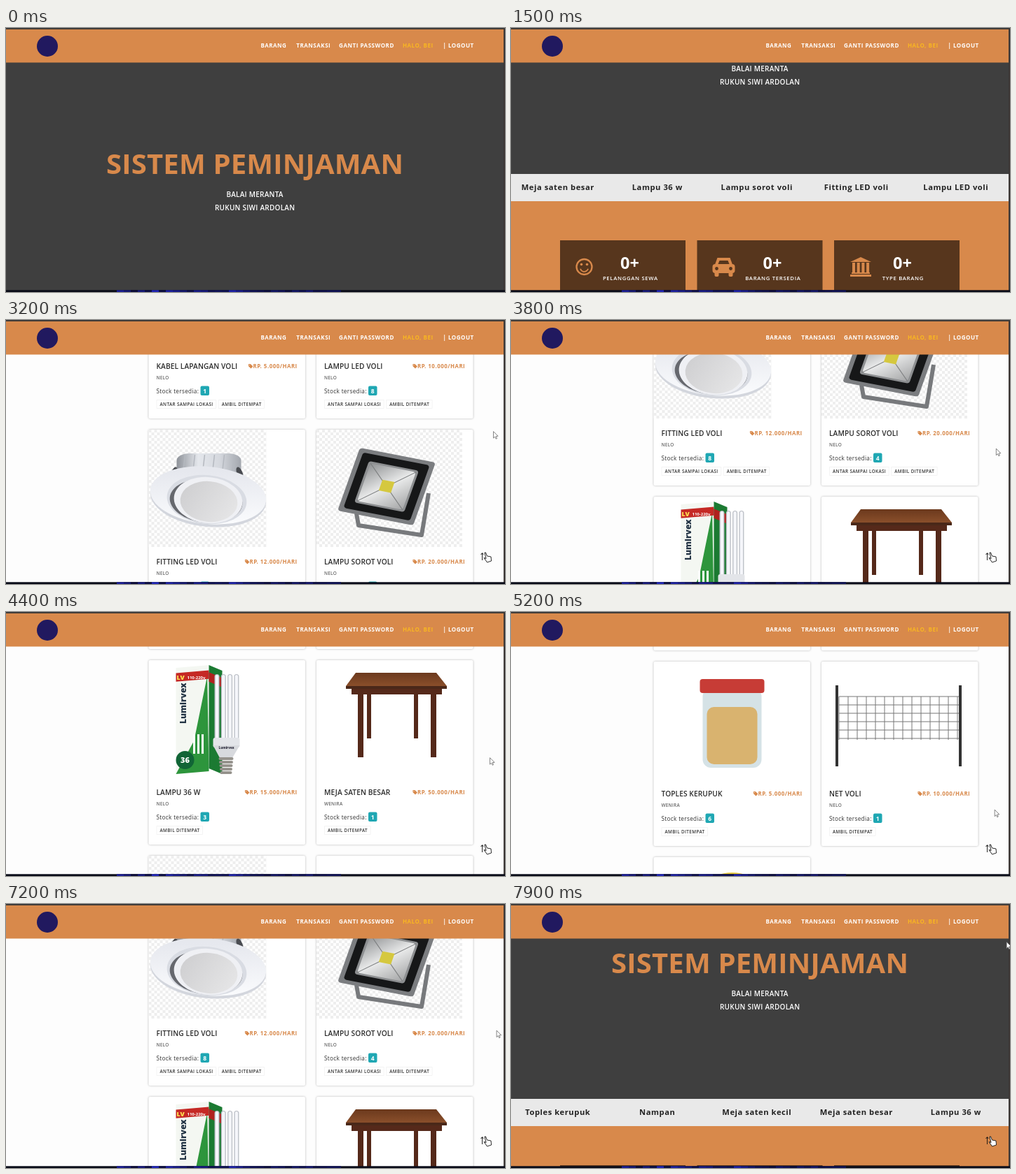
Recreate the animation shown at these times as an HTML page with a canvas. Size 712 by 378 pixels, loop 8000 ms.

```html
<!DOCTYPE html>
<html lang="id">
<head>
<meta charset="utf-8">
<title>Sistem Peminjaman</title>
<style>
html, body { margin: 0; width: 100%; height: 100%; overflow: hidden; background: #3f3f3f; }
canvas { display: block; width: 712px; height: 378px; }
</style>
</head>
<body>
<canvas id="stage" width="712" height="378"></canvas>
<script>
const c = document.getElementById('stage').getContext('2d');
const LOOP = 8000, STEP = 100, END = 2341;
const ORANGE = '#d8894b', DARK = '#3f3f3f', BROWN = '#57361d', YELLOW = '#ffd60a';

// the scrollbar is dragged: time and pointer height
const drag = [[1200, 38], [1500, 62], [2400, 111.9], [3200, 158.1], [4400, 207.2],
  [6150, 370], [7900, 52.7], [8000, 46]];
function dragY(t) {
  const i = drag.findIndex(k => k[0] >= t);
  if (i < 1) return drag[0][1];
  const [t0, y0] = drag[i - 1], [t1, y1] = drag[i];
  return y0 + (y1 - y0) * (t - t0) / (t1 - t0);
}
const scrollAt = t => Math.min(END, Math.round((dragY(t) - 38) * 7.5));

function text(s, x, y, size, weight, color, gap = 0, align = 'left') {
  c.font = `${weight} ${size}px "Open Sans", sans-serif`;
  c.letterSpacing = gap + 'px';
  c.textAlign = align;
  c.fillStyle = color;
  c.fillText(s, x + (align === 'center' ? gap / 2 : 0), y);
  return c.measureText(s).width;
}
function rect(color, x, y, w, h) {
  c.fillStyle = color;
  c.fillRect(x, y, w, h);
}
function round(color, x, y, w, h, r) {
  c.beginPath();
  c.roundRect(x, y, w, h, r);
  c.fillStyle = color;
  c.fill();
}
function path(pts, closed) {
  c.beginPath();
  for (let i = 0; i < pts.length; i += 2) c.lineTo(pts[i], pts[i + 1]);
  if (closed) c.closePath();
}
function poly(color, ...pts) {
  path(pts, true);
  c.fillStyle = color;
  c.fill();
}
function line(color, width, ...pts) {
  path(pts);
  c.strokeStyle = color;
  c.lineWidth = width;
  c.stroke();
}
function oval(color, x, y, rx, ry = rx, tilt = 0, width = 0) {
  c.beginPath();
  c.ellipse(x, y, rx, ry, tilt, 0, 7);
  c.fillStyle = c.strokeStyle = color;
  c.lineWidth = width;
  width ? c.stroke() : c.fill();
}
function at(x, y, draw, scale = 1) {
  c.save();
  c.translate(x, y);
  c.scale(scale, scale);
  draw();
  c.restore();
}
// draws in a unit square spanned by the edges u and v
function plane(x, y, ux, uy, vx, vy, draw) {
  c.save();
  c.transform(ux, uy, vx, vy, x, y);
  draw();
  c.restore();
}
const inset = (color, d, r = .04) => round(color, d, d, 1 - 2 * d, 1 - 2 * d, r);
function fade(x0, y0, x1, y1, ...colors) {
  const g = c.createLinearGradient(x0, y0, x1, y1);
  colors.forEach((s, i) => g.addColorStop(i / (colors.length - 1), s));
  return g;
}

const tile = document.createElement('canvas');
tile.width = tile.height = 8;
const tc = tile.getContext('2d');
tc.fillStyle = '#fff';
tc.fillRect(0, 0, 8, 8);
tc.fillStyle = '#eeeeee';
tc.fillRect(0, 0, 4, 4);
tc.fillRect(4, 4, 4, 4);
const checks = c.createPattern(tile, 'repeat');

// icons
function car(color, hole) {
  poly(color, -13, -2, -9, -13, 9, -13, 13, -2);
  round(color, -16, -4, 32, 13, 4);
  poly(hole, -8, -4, -6, -9, 6, -9, 8, -4);
  for (const x of [-10, 10]) {
    round(color, x - 3, 6, 6, 8, 2);
    oval(hole, x, 2.5, 2.4);
  }
}
function bank() {
  poly(ORANGE, -15, -7, 0, -14, 15, -7);
  for (let i = 0; i < 4; i++) rect(ORANGE, -12 + i * 6.7, -6, 4, 14);
  rect(ORANGE, -13, 8, 26, 2);
  rect(ORANGE, -15, 11, 30, 3);
}
function smile() {
  oval(ORANGE, 0, 0, 11, 11, 0, 2.3);
  for (const x of [-4, 4]) oval(ORANGE, x, -3.5, 1.8);
  c.beginPath();
  c.arc(0, 1, 5.8, .3, 2.84);
  c.lineWidth = 1.8;
  c.stroke();
}
const badge = (x, y) => oval('#21195f', x, y, 15);

// product pictures, from the card's top left corner
function socketStrip() {
  for (let i = 0; i < 6; i++)
    for (const [color, w] of [['#aaa69d', 5.5], ['#e5e2db', 4]])
      oval(color, 54 + i * 5, 74 - i * 3, 48, 15 + i, -.55, w);
  line('#dedad2', 5, 10, 125, 70, 66, 118, 32);
  line('#34322f', 4, 104, 25, 114, 22);
  for (let d = 13; d >= 0; d--)
    plane(62, 112 + d, 122, -80, 31, 20, () => inset(d ? '#bfb9ae' : '#e9e6df', 0, .12));
  plane(62, 112, 122, -80, 31, 20, () => {
    rect('#5f1116', .06, .12, .16, .76);
    rect('#a5222a', .08, .18, .12, .6);
  });
  for (let i = 0; i < 3; i++) at(117 + i * 32, 92 - i * 21, () => {
    ['#aaa79f', '#f4f2ed', '#c9c5bd'].forEach((s, k) => oval(s, 0, 0, 18 - k * 3, 14.5 - k * 2.7, -.25));
    for (const x of [-5, 5]) oval('#4b4945', x, -x / 4, 1.5);
  });
}
function floodLight() {
  line('#252423', 5, 163, 89, 186, 139, 158, 151);
  plane(62, 30, 112, 4, -17, 112, () => {
    inset('#111', 0);
    inset('#34312f', .02);
    rect('#777772', .12, .15, .68, .44);
    rect('#cfcdc3', .15, .18, .62, .37);
    rect('#e9df91', .43, .27, .28, .27);
    for (let i = 0; i < 16; i++) rect('#f8f3c5', .45 + i % 4 * .065, .29 + (i >> 2) * .06, .04, .04);
  });
  text('lumen', 108, 129, 5, 600, '#67615d');
}
function downLight() {
  rect(checks, 0, 0, 168, 168);
  plane(40, 34, 92, 0, 0, 50, () => inset(fade(0, 0, 1, 0, '#8e9299', '#e4e7ec', '#d5d8de', '#a3a7ae'), 0, .2));
  for (let x = 52; x < 125; x += 14) line('#b4b8bf', 1.5, x, 36, x - 3, 62);
  for (const x of [36, 130]) oval('#4a4c51', x, 62, 4, 9, x < 80 ? .4 : -.4);
  oval('#d3d6dd', 85, 97, 83, 42, .1);
  oval(fade(0, 60, 0, 135, '#e6e8ee', '#fafbfd'), 85, 94, 83, 41, .1);
  oval('#d9dce3', 83, 100, 57, 35, .1);
  oval('#66686e', 82, 102, 52, 31, .1);
  oval('#eff0f4', 85, 101, 49, 33, .1);
  oval(fade(50, 80, 120, 130, '#cfcfd1', '#e6e6e7'), 86, 103, 41, 29, .1);
}
function spotLight() {
  rect(checks, 0, 0, 208, 168);
  line('#77797c', 6, 57, 120, 60, 137, 150, 151, 160, 91);
  plane(62, 26, 108, 21, -32, 90, () => {
    inset('#7b7d80', 0);
    inset('#161718', .06);
    inset('#8d8f91', .17);
    inset(fade(.2, .2, .8, .8, '#8f9193', '#e9eaea', '#a4a5a6'), .2);
    for (const [a, b] of [[.2, .2], [.8, .2], [.8, .8], [.2, .8]]) line('#7d7f80', .01, a, b, .5, .5);
    rect('#d5c83f', .42, .41, .16, .17);
  });
}
function bulbBox() {
  plane(39, 11, 47, -4, 0, 152, () => {
    inset('#f4f7f2', 0, 0);
    poly('#2d953c', .95, .1, 1, 1, 0, 1, .55, .7);
    rect('#c52925', 0, .05, 1, .08);
  });
  plane(86, 7, 19, 8, 0, 148, () => {
    inset('#1b7a32', 0, 0);
    rect('#b0211e', 0, .07, 1, .09);
  });
  text('LV', 40, 28, 9, 800, '#ffe451');
  text('110-220v', 55, 27, 6, 700, '#fff');
  at(53, 91, () => { c.rotate(-Math.PI / 2); text('Lumirvex', 0, 0, 12, 800, '#234'); });
  for (let i = 0; i < 3; i++) line('#fff', 3, 65 + i * 6, 134, 65 + i * 6, 106);
  oval('#116536', 52, 143, 13);
  text('36', 52, 147, 11, 800, '#fff', 0, 'center');
  for (let x = 94; x < 125; x += 9.3) {
    round('#b9bdc4', x, 20, 7, 94, 4);
    round('#f5f6fa', x + 1.3, 21, 4.4, 92, 3);
  }
  round('#e3e5e9', 92, 111, 38, 14, 3);
  poly('#d8dade', 92, 122, 130, 122, 120, 139, 101, 139);
  text('Lumirvex', 111, 127, 4.5, 800, '#334', 0, 'center');
  for (let i = 0; i < 5; i++) round('#96938d', 100 + i / 2, 139 + i * 5, 21 - i, 4, 2);
}
function table(top, leg) {
  for (const x of [72, 139]) rect(leg, x, 42, 6, 70);
  for (const x of [59, 163]) rect(leg, x, 42, 8, 97);
  rect(leg, 50, 38, 129, 11);
  poly(top, 56, 18, 171, 18, 186, 37, 42, 37);
  rect('#4a2819', 42, 37, 144, 4);
}
const bigTable = () => table(fade(0, 18, 0, 37, '#6b391d', '#8a4f2b'), '#55291a');
function smallTable() {
  rect(checks, 0, 0, 168, 168);
  at(0, 26, () => table('#b38a5c', '#76512f'), .76);
}
function tray() {
  ['#a9adb0', '#d9dcde', '#c2c6c9'].forEach((s, i) => oval(s, 112, 86 - i, 83 - i * 8, 42 - i * 6));
}
function jar() {
  round('#d5e2e6', 70, 38, 84, 114, 12);
  round('#d9b36f', 76, 65, 72, 82, 10);
  round('#c73c36', 66, 25, 92, 20, 4);
}
function net() {
  for (let x = 25; x < 200; x += 13) line('#777', 1, x, 50, x, 112);
  for (let y = 50; y < 113; y += 12) line('#777', 1, 25, y, 197, y);
  for (const x of [20, 196]) rect('#333', x, 34, 4, 116);
}
function ball() {
  oval('#e6c940', 112, 84, 62);
  oval('#3b61a4', 112, 84, 62, 24, .6);
}

const BOTH = ['ANTAR SAMPAI LOKASI', 'AMBIL DITEMPAT'], PICKUP = ['AMBIL DITEMPAT'];
const goods = [
  ['KABEL LAPANGAN VOLI', '5.000', 'NELO', '1', BOTH, socketStrip],
  ['LAMPU LED VOLI', '10.000', 'NELO', '8', BOTH, floodLight],
  ['FITTING LED VOLI', '12.000', 'NELO', '8', BOTH, downLight],
  ['LAMPU SOROT VOLI', '20.000', 'NELO', '4', BOTH, spotLight],
  ['LAMPU 36 W', '15.000', 'NELO', '3', PICKUP, bulbBox],
  ['MEJA SATEN BESAR', '50.000', 'WENIRA', '1', PICKUP, bigTable],
  ['MEJA SATEN KECIL', '30.000', 'WENIRA', '2', PICKUP, smallTable],
  ['NAMPAN', '5.000', 'WENIRA', '9', PICKUP, tray],
  ['TOPLES KERUPUK', '5.000', 'WENIRA', '6', PICKUP, jar],
  ['NET VOLI', '10.000', 'NELO', '1', PICKUP, net],
  ['BOLA VOLI', '5.000', 'NELO', '-', [], ball]
];

function product([name, price, owner, stock, tags, picture]) {
  c.save();
  c.shadowColor = 'rgba(0,0,0,.3)';
  c.shadowBlur = 3;
  round('#fff', 0, 0, 223.5, tags.length ? 264 : 251, 2);
  c.restore();
  picture();
  text(name, 11, 192.7, 10.2, 600, '#2c2c2c', .08);
  const w = text(`RP. ${price}/HARI`, 212.2, 192, 7.9, 700, ORANGE, .5, 'right');
  at(212.2 - w - 6.5, 186, () => {
    poly(ORANGE, 0, 0, 3, 0, 6.5, 3.5, 3.5, 6.5, 0, 3);
    oval('#fff', 1.5, 1.5, .6);
  });
  text(owner, 11, 207.6, 6.4, 600, '#666', .25);
  text('Stock tersedia:', 11, 227.6, 8.2, 400, '#333', .33);
  const bw = stock === '-' ? 10.5 : 12.5;
  round('#1fa7b3', 74, 217.5, bw, 13.5, 2);
  text(stock, 74 + bw / 2, 227.6, 8.5, 700, '#fff', 0, 'center');
  let x = 11.5;
  for (const tag of tags) {
    const tw = text(tag, x + 4.5, 246.2, 6.3, 600, '#333', .4);
    c.strokeStyle = '#f3f3f3';
    c.lineWidth = 1;
    c.strokeRect(x, 237.5, tw + 8.5, 12);
    x += tw + 12;
  }
}

const rental = ['Toples kerupuk', 'Nampan', 'Meja saten kecil', 'Meja saten besar',
  'Lampu 36 w', 'Lampu sorot voli', 'Fitting LED voli', 'Lampu LED voli'];

function hero(t) {
  rect(DARK, 0, 0, 712, 389);
  text('SISTEM PEMINJAMAN', 355, 209, 40, 700, ORANGE, .2, 'center');
  text('BALAI MERANTA', 355, 241.5, 10, 600, '#fff', .25, 'center');
  text('RUKUN SIWI ARDOLAN', 355, 260.5, 10, 600, '#fff', .25, 'center');
  rect('#e9e9e9', 0, 389, 712, 39);
  const first = 3 - Math.floor(t / 2000);
  for (let i = 0; i < 5; i++)
    text(rental[first + i], 66.5 + i * 142, 412, 11.2, 700, '#222', .55, 'center');
}

function counters() {
  rect(ORANGE, 0, 428, 712, 190);
  [['PELANGGAN SEWA', 100, smile],
   ['BARANG TERSEDIA', 108, () => car(ORANGE, BROWN)],
   ['TYPE BARANG', 98, bank]].forEach(([label, mid, icon], i) => at(70 + i * 195.5, 484, () => {
    rect(BROWN, 0, 0, 179, 79);
    at(i ? 38 : 34.5, 38, icon);
    text('0+', mid - .5, 40.5, 23.5, 700, '#fff', 0, 'center');
    text(label, mid, 57, 7.7, 600, '#fff', .7, 'center');
  }));
}

function catalog() {
  rect('#fdfdfd', 0, 618, 712, 1870);
  text('PILIH KEBUTUHAN ANDA', 355, 692, 17.7, 700, '#222', .7, 'center');
  for (const x of [316, 365.5]) rect('#333', x, 707, 28.5, 1.2);
  at(355, 708, () => car('#e5d52b', '#fdfdfd'), .35);
  text('Pilih Segala Kebutuhan Anda, dan Segera Koordinasikan dengan Penanggungjawab Barang',
    355, 730, 8.6, 300, '#444', .35, 'center');
  rect('#e8e8e8', 43, 778.5, 145, 1);
  ['ALL', 'PERALATAN OLAHRAGA', 'PERALATAN SINOMAN', 'PERALATAN NON SEWA'].forEach((s, i) => {
    const y = 779 + i * 26.4;
    rect(i ? '#dcdcdc' : '#786ccf', 43, y + 3, 2, 20);
    rect('#e8e8e8', 43, y + 26, 145, 1);
    text(s, 57, y + 16, 7.8, 600, i ? '#222' : '#786ccf', .58);
  });
  goods.forEach((g, i) => at(i % 2 ? 443 : 203.5, 778 + (i >> 1) * 280, () => product(g)));
}

function footer() {
  rect(ORANGE, 0, 144, 712, 202);
  text('TENTANG KAMI', 43, 190, 12, 600, '#fff', .8);
  badge(59, 225);
  text('Lumampahing Karsa Siwi Rahayuning Budi', 43, 262, 7.5, 500, '#fff', .3);
  text('HUBUNGI KAMI', 363, 190, 12, 600, '#fff', .8);
  text('Balai Meranta Rukun Siwi Ardolan', 363.5, 220, 7.5, 500, '#fff', .45);
  oval(YELLOW, 366, 244, 2.7);
  poly(YELLOW, 363.5, 245, 368.5, 245, 366, 250);
  oval(ORANGE, 366, 244, 1);
  text('Bentaru, Sukamiring, Lodaran, Wetan Sarwi, JTU', 374, 249, 8.4, 600, YELLOW, .3);
  round(YELLOW, 363.5, 264, 8.5, 6.5, 1);
  line(ORANGE, .8, 363.5, 265.5, 367.8, 268, 372, 265.5);
  text('ardolan52@surat.test', 375, 270, 8.6, 600, YELLOW, .3);
  rect('#f7d80d', 363.5, 289, 95.5, 23);
  text('SHOW LOCATION', 411, 303.2, 7.2, 600, '#222', .6, 'center');
  rect('#000', 0, 345.5, 712, 32);
  text('Copyright © Balai Meranta Rukun-Siwi Ardolan', 355, 362.5, 8.2, 400, '#fff', .45, 'center');
}

function navbar() {
  rect(ORANGE, 0, 0, 712, 49.5);
  badge(59, 26);
  [['BARANG', 363.4], ['TRANSAKSI', 414.3], ['GANTI PASSWORD', 475.1],
   ['HALO, BEI', 565.9, '#f8b622'], ['| LOGOUT', 623.4]].forEach(([s, x, color]) =>
    text(s, x, 28, 8, 700, color || '#fff', .53));
}

function scrollHand() {
  line('#111', .9, 679.5, 344, 679.5, 334);
  line('#111', .9, 677.5, 336, 679.5, 333.5, 681.5, 336);
  path([683, 333, 684.5, 333, 686.5, 338, 692, 339, 692.5, 345, 686.5, 347, 682, 340.5, 685, 341.5], true);
  c.fillStyle = '#fff';
  c.fill();
  c.stroke();
}

function pointer() {
  path([0, 0, 0, 10.5, 2.4, 8.3, 4, 11.8, 5.6, 11, 4.1, 7.6, 7.3, 7.4], true);
  c.fillStyle = '#fff';
  c.strokeStyle = '#555';
  c.lineWidth = .8;
  c.fill();
  c.stroke();
}

// window edges, with a strip of wallpaper below
function chrome() {
  rect('#403b38', 0, 0, 712, 2);
  rect('#3b3634', 710, 0, 2, 378);
  rect('#090b18', 0, 375.3, 712, 3);
  for (let x = 158; x < 476; x += 10) {
    const glow = Math.abs(Math.sin(x * 12.9898) * 43758.5) % 1 * (x < 376 ? 1 : .4);
    rect(`hsl(238 70% ${12 + glow * 30}%)`, x, 375.3, 10, 3);
  }
}

function draw(t) {
  const scroll = scrollAt(t);
  c.lineJoin = 'round';
  at(0, -scroll, () => { hero(t); counters(); catalog(); });
  at(0, END - scroll, footer);
  navbar();
  c.globalAlpha = Math.min(1, Math.max(0, (t - 1500) / 400));
  scrollHand();
  c.globalAlpha = 1;
  chrome();
  if (t > 2500) at(690 + 1.9 * ((t - 4900) / 1000) ** 2, dragY(t) + 1.5, pointer, .9);
}

const start = performance.now();
function tick() {
  const t = (performance.now() - start) % LOOP;
  draw(Math.floor(t / STEP) * STEP);
  requestAnimationFrame(tick);
}
tick();
</script>
</body>
</html>
```
